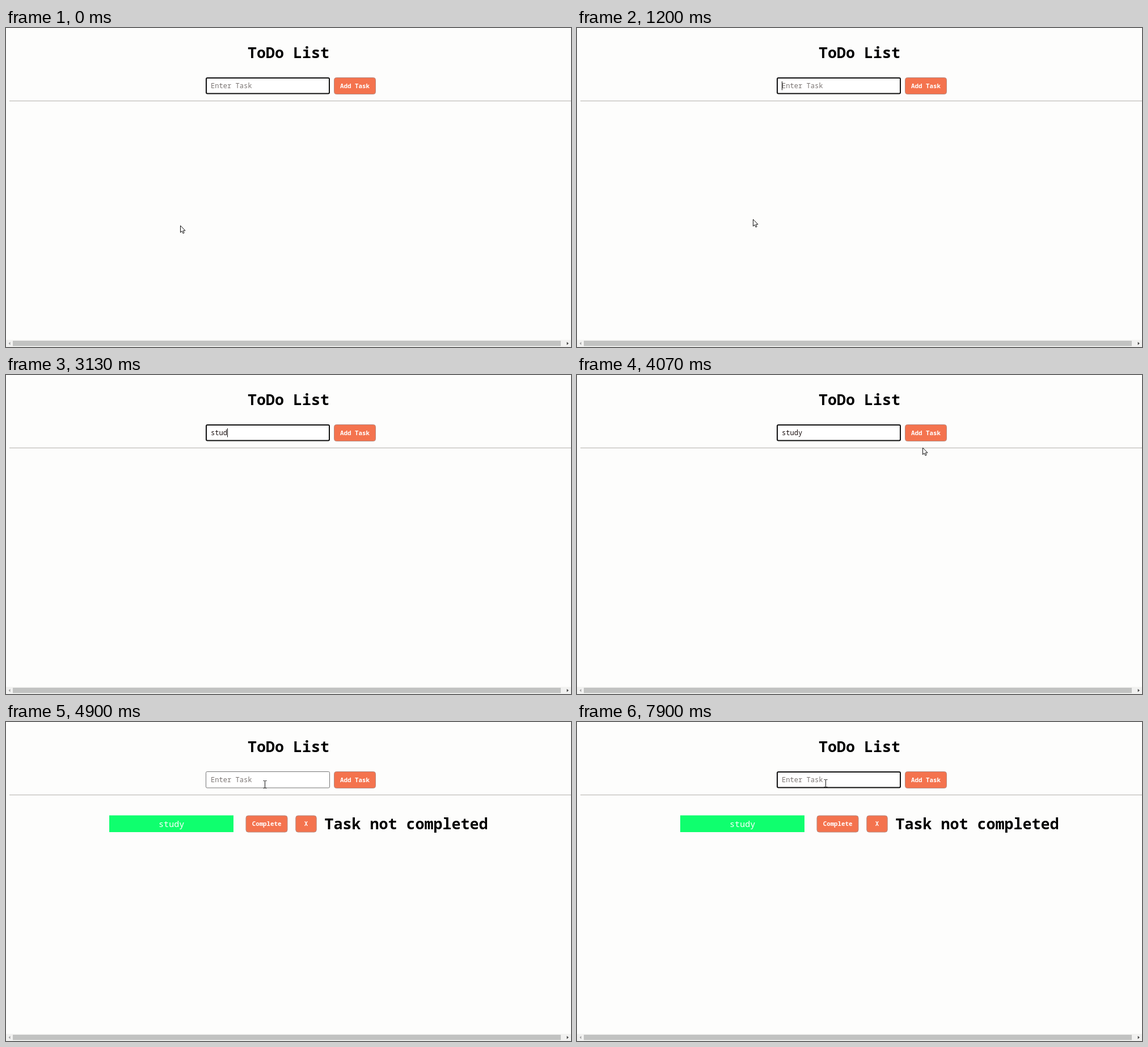
These frames come from a looping animation (996 by 562 pixels, 8000 ms). An HTML page:

```html
<!DOCTYPE html>
<html lang="en">
<head>
<meta charset="utf-8">
<title>ToDo List</title>
<style>
html, body { margin: 0; width: 100%; height: 100%; overflow: hidden; background: #fdfdfc; }
svg { display: block; width: 100vw; height: 100vh; }
text { font-family: "Noto Sans Mono", "DejaVu Sans Mono", monospace; white-space: pre; }
.big { font-size: 26.67px; font-weight: 700; fill: #000; }
.field { font-size: 12.08px; }
.btn rect { fill: #f4734e; stroke: #b68a80; }
.btn text { font-size: 10.8px; font-weight: 700; fill: #fff; text-anchor: middle; }
.cursor path { fill: #fff; stroke: #111; stroke-linejoin: round; stroke-linecap: round; }
</style>
</head>
<body>
<svg viewBox="0 0 996 562">
  <rect width="996" height="562" fill="#fdfdfc"/>
  <text class="big" x="426" y="53">ToDo List</text>

  <rect id="box"/>
  <text id="value" class="field" x="361" y="106.3"></text>
  <rect id="caret" x="361" y="94" width="1" height="15.5" fill="#111"/>

  <g id="add" class="btn">
    <rect x="578.5" y="87.5" width="73" height="29" rx="4"/>
    <text x="615" y="106.2">Add Task</text>
  </g>
  <rect x="6" y="128" width="990" height="1" fill="#b3b1ac"/>

  <g id="task">
    <rect x="182" y="164.5" width="219" height="29.5" fill="#0fff6e"/>
    <text x="291.7" y="184.6" font-size="15.1" fill="#fff" text-anchor="middle">study</text>
    <g class="btn">
      <rect x="423" y="165" width="73" height="29" rx="4"/>
      <text x="459.6" y="183.3">Complete</text>
    </g>
    <g class="btn">
      <rect x="510.8" y="165" width="36.4" height="29" rx="4"/>
      <text x="529" y="183.3">X</text>
    </g>
    <text class="big" x="561.5" y="189">Task not completed</text>
  </g>

  <rect y="549.5" width="996" height="12.5" fill="#f1f1f0"/>
  <rect x="12" y="551" width="966" height="9.3" fill="#c1c2c1"/>
  <path d="M7.5 553 V558.4 L4.6 555.7 Z" fill="#a0a0a0"/>
  <path d="M988.6 553 V558.4 L991.8 555.7 Z" fill="#404040"/>

  <g id="arrow" class="cursor">
    <path d="M0 .5 V12.2 L2.7 9.7 L4.6 13.9 L6.6 13 L4.7 9 H8.2 Z"/>
  </g>
  <g id="beam" class="cursor">
    <path d="M-2.5 -6.5 H-1 L0 -5.8 L1 -6.5 H2.5 M0 -5.8 V5.8 M-2.5 6.5 H-1 L0 5.8 L1 6.5 H2.5" style="fill:none"/>
  </g>
  <g id="hand" class="cursor">
    <path d="M-1.2 9.6 V.9 Q-1.2 -.6 .2 -.6 Q1.6 -.6 1.6 .9 V5.6 Q1.8 4.4 3 4.5 Q4.3 4.6 4.3 6 Q4.6 5.1 5.6 5.3 Q6.7 5.5 6.7 6.8 Q7.2 6.1 8 6.4 Q8.8 6.7 8.8 8 V11 Q8.8 13 7.3 14.6 V16.4 H.4 V14.8 Q-2 12.6 -3.6 9.8 Q-4.6 8 -3.5 7.6 Q-2.6 7.4 -1.2 9.6 Z"/>
    <path d="M1.6 5.6 V8.6 M4.3 6 V8.8 M6.7 6.8 V9" stroke-width=".8"/>
  </g>
</svg>
<script>
const LOOP = 8000;
const el = id => document.getElementById(id);

// time, x, y of the pointer's hot spot
const path = [
  [30, 307, 348], [460, 310, 338], [1200, 310, 338], [1370, 325, 240],
  [1530, 352, 100], [1610, 365, 58], [1670, 372, 60], [1830, 387, 101],
  [3940, 387, 101], [4000, 465, 113], [4070, 609, 128], [4130, 627, 118],
  [4260, 639, 104], [4740, 639, 104], [4800, 600, 109], [4900, 457, 110],
  [5070, 438.5, 108]
];
const keys = [2570, 2830, 2930, 3100, 3270];
// the caret flips at each of these times, starting hidden
const flips = [170, 700, 1200, 1740, 2270, 3800, 5270, 5770, 6300, 6840, 7370, 7900];
const PRESS = 4430, RELEASE = 4570, FOCUS = 5270;

function pointer(t) {
  const i = path.findIndex(p => p[0] > t);
  if (i === 0) return path[0].slice(1);
  if (i < 0) return path[path.length - 1].slice(1);
  const [ta, xa, ya] = path[i - 1], [tb, xb, yb] = path[i];
  const k = (t - ta) / (tb - ta);
  return [xa + (xb - xa) * k, ya + (yb - ya) * k];
}

const inside = (x, y, l, r, top, bottom) => x >= l && x <= r && y >= top && y <= bottom;
const show = (node, on) => node.setAttribute("display", on ? "inline" : "none");

function setBox(focused) {
  const w = focused ? 2 : 1, d = w / 2, box = el("box");
  const attrs = {
    x: 352 + d, y: 87 + d, width: 219 - w, height: 29.5 - w, rx: 2,
    fill: "#fff", stroke: focused ? "#101010" : "#767676", "stroke-width": w
  };
  for (const name in attrs) box.setAttribute(name, attrs[name]);
}

function draw(t) {
  const [x, y] = pointer(t);
  const typed = t < RELEASE ? keys.filter(k => k <= t).length : 0;
  const focused = t < PRESS || t >= FOCUS;
  const overAdd = inside(x, y, 575, 655.5, 86, 118);
  const overBox = inside(x, y, 352, 571, 87, 117);
  const hidden = t >= keys[0] && t < 3970;

  setBox(focused);
  const value = el("value");
  value.textContent = typed ? "study".slice(0, typed) : "Enter Task";
  value.setAttribute("fill", typed ? "#1a1010" : "#7b7573");

  el("caret").setAttribute("x", 361 + Math.round(typed * 7.25));
  show(el("caret"), focused && flips.filter(f => f <= t).length % 2 === 1);

  el("add").setAttribute("transform",
    overAdd ? "translate(615 102) scale(1.1) translate(-615 -102)" : "");
  show(el("task"), t >= RELEASE);

  const kind = overAdd ? "hand" : overBox ? "beam" : "arrow";
  for (const id of ["arrow", "beam", "hand"]) {
    show(el(id), id === kind && !hidden);
    el(id).setAttribute("transform", `translate(${Math.floor(x) + .5} ${Math.round(y)})`);
  }
}

const start = performance.now();
function tick() {
  draw((performance.now() - start) % LOOP);
  requestAnimationFrame(tick);
}
tick();
</script>
</body>
</html>
```
